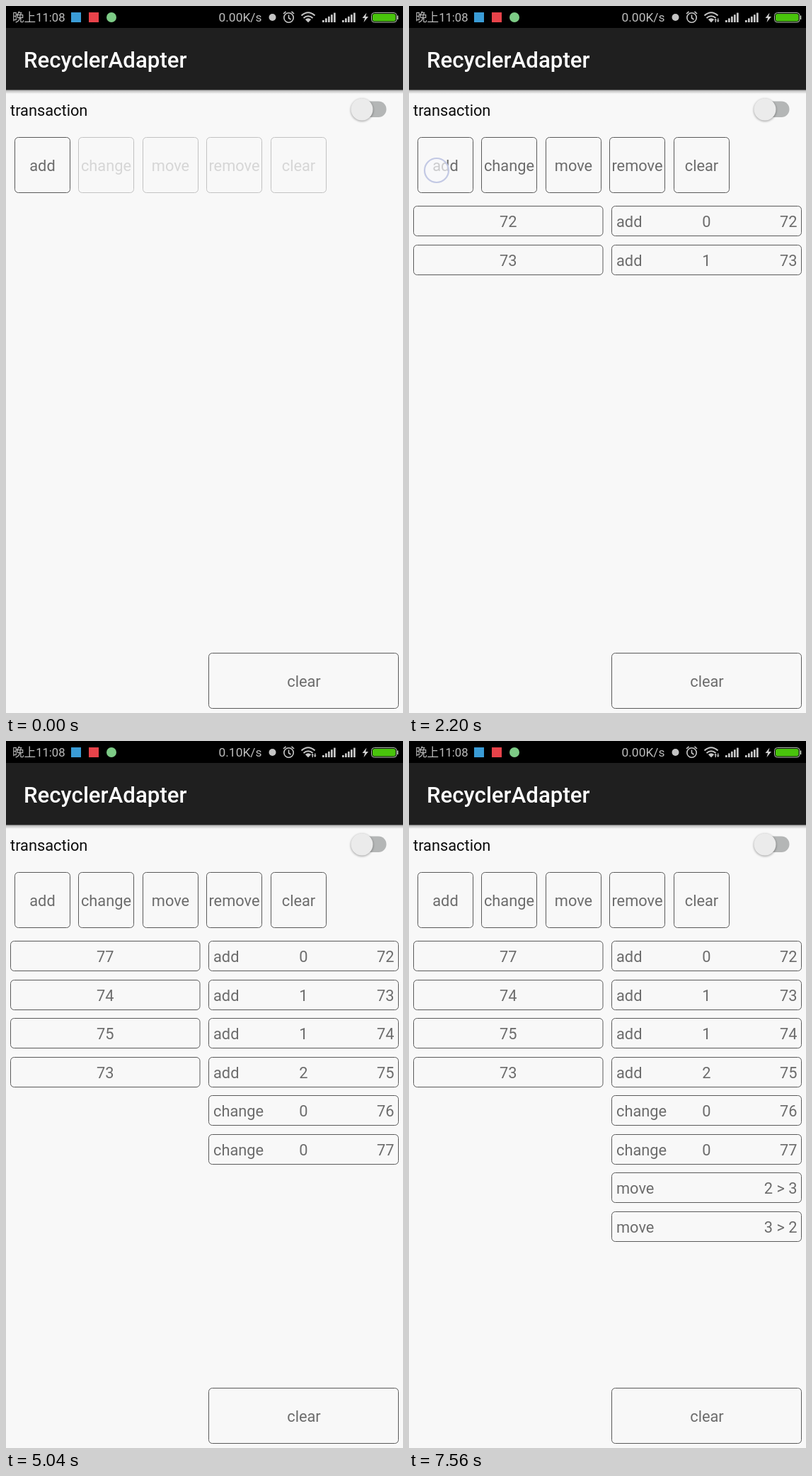
These frames come from a looping animation (561 px wide and 998 px high, 8000 ms). An HTML page:

```html
<!DOCTYPE html>
<html lang="zh">
<head>
<meta charset="utf-8">
<title>RecyclerAdapter</title>
<style>
  html, body { margin: 0; width: 100%; height: 100%; overflow: hidden; background: #f8f8f8; }
  svg { display: block; width: 561px; height: 998px; }
  text { font: 21.8px Roboto, sans-serif; fill: #6c6c6c; }
  .mid { text-anchor: middle; }
  .end { text-anchor: end; }
  .box { fill: none; stroke: #5a5a5a; }
  .status { font: 16.6px Roboto, "Noto Sans CJK SC", "Noto Sans CJK", sans-serif; fill: #bdbdbd; }
  .title { font-size: 31.2px; font-weight: 500; fill: #fff; }
  .off .box { stroke: #c2c2c2; }
  .off text { fill: #d6d6d6; }
</style>
</head>
<body>
<svg id="stage" viewBox="0 0 561 998">
  <defs>
    <linearGradient id="shade" x2="0" y2="1">
      <stop offset="0" stop-color="#000" stop-opacity=".32"/>
      <stop offset="1" stop-color="#000" stop-opacity="0"/>
    </linearGradient>
    <filter id="soft" x="-30%" y="-30%" width="160%" height="160%"><feGaussianBlur stdDeviation="1.5"/></filter>
  </defs>
  <rect width="561" height="998" fill="#f8f8f8"/>
  <rect y="118" width="561" height="6" fill="url(#shade)"/>
  <rect y="31" width="561" height="87.5" fill="#1f1f1f"/>
  <rect width="561" height="31" fill="#000"/>
  <text class="title" x="25" y="87">RecyclerAdapter</text>

  <text class="status" x="9" y="22">晚上11:08</text>
  <rect x="92" y="9" width="14" height="14" fill="#3a9cd6"/>
  <rect x="117" y="9" width="14" height="14" fill="#e8434a"/>
  <circle cx="149" cy="16" r="7" fill="#7dcb86"/>
  <text id="speed" class="status end" x="361.5" y="22" style="font-size:17.4px"></text>
  <circle cx="376.5" cy="16" r="5" fill="#c4c4c4"/>
  <g fill="none" stroke="#c8c8c8" stroke-width="1.6">
    <circle cx="399.5" cy="16.5" r="6.7"/>
    <path d="M399.5 12.5v4.5l3 2M392 11l3.5-3.2M407 11l-3.5-3.2"/>
    <path d="M417.5 13.5q9.5-8.5 19 0M420.5 17q6.500-5.500 13 0" stroke-width="2"/>
  </g>
  <path d="M422.800 19q4.200-3.400 8.400 0l-4.200 4.300z" fill="#c8c8c8"/>
  <path id="arrows" d="M432.500 23v-3h-1.200l1.900-2.300 1.900 2.300h-1.200v3zM436 17.500v3h-1.200l1.900 2.500 1.900-2.500h-1.200v-3z" fill="#c8c8c8"/>
  <g id="signal" fill="#c8c8c8"></g>
  <path d="M509.500 9.500l-6 7.500h3.600l-1.600 6 6.500-8h-3.800z" fill="#d0d0d0"/>
  <rect x="516.500" y="9.500" width="35.500" height="13.500" rx="4" fill="#000" stroke="#b9c4b4"/>
  <rect x="518" y="11" width="32.500" height="10.500" rx="2.800" fill="#49c40c"/>
  <rect x="552.500" y="13.500" width="1.800" height="5.500" fill="#b9c4b4"/>

  <text x="6" y="154.500" style="fill:#0c0c0c">transaction</text>
  <rect x="492" y="134.500" width="45.500" height="22.500" rx="11.200" fill="#b4b6b6"/>
  <circle cx="503" cy="147" r="16" fill="#000" opacity=".3" filter="url(#soft)"/>
  <circle cx="503" cy="146" r="15.500" fill="#ebebeb"/>
  <g id="buttons"></g>
  <g id="rows"></g>
  <circle id="touch" r="17" fill="#fafafd" fill-opacity=".68" stroke="#c3c9e4" stroke-width="2.200"/>
</svg>
<script>
const LOOP = 8000, FADE = 120, MOVE = 250;
const $ = id => document.getElementById(id);

function add(parent, tag, attrs, label) {
  const el = document.createElementNS("http://www.w3.org/2000/svg", tag);
  for (const key in attrs) el.setAttribute(key, attrs[key]);
  if (label !== undefined) el.textContent = label;
  parent.append(el);
  return el;
}
const box = (g, x, y, width, height) =>
  add(g, "rect", { class: "box", x, y, width, height, rx: 5 });
const label = (g, x, y, s, cls = "") => add(g, "text", { x, y, class: cls }, s);

// Each touch: start, moment the click acts, position
const taps = [
  [1000, 1180, 39, 232], [2040, 2240, 39, 232],
  [3400, 3610, 157, 233], [4560, 4770, 157, 233],
  [5800, 6040, 220, 227], [6800, 7040, 220, 227]
];
const [add1, add2, change1, change2, move1, move2] = taps.map(tap => tap[1]);

// Left column: value, first row, fade in, fade length, moves, fade out
const cells = [
  { n: 72, row: 0, from: add1, fade: FADE, moves: [], to: change1 },
  { n: 73, row: 1, from: add1, fade: FADE, moves: [[add2, 3], [move1, 2], [move2, 3]] },
  { n: 74, row: 1, from: add2 + MOVE, fade: FADE, moves: [] },
  { n: 75, row: 2, from: add2 + MOVE, fade: FADE, moves: [[move1, 3], [move2, 2]] },
  { n: 76, row: 0, from: change1, fade: MOVE, moves: [], to: change2 },
  { n: 77, row: 0, from: change2, fade: MOVE, moves: [] }
];

// Right column: time, action, index, value
const logs = [
  [add1, "add", 0, 72], [add1, "add", 1, 73],
  [add2, "add", 1, 74], [add2, "add", 2, 75],
  [change1, "change", 0, 76], [change2, "change", 0, 77],
  [move1, "move", "", "2 > 3"], [move2, "move", "", "3 > 2"]
];
const speeds = [[0, "0.00K/s"], [3440, "0.10K/s"], [7560, "0.00K/s"]];

for (const x of [447, 475])
  for (let i = 0; i < 5; i++) {
    const height = 3 + i * 2.6;
    add($("signal"), "rect", { x: x + i * 4, y: 23 - height, width: 2.7, height });
  }

const late = [];
["add", "change", "move", "remove", "clear"].forEach((name, i) => {
  const g = add($("buttons"), "g", {});
  const x = Math.floor(12 + i * 90.5) + .5;
  box(g, x, 185.5, 78, 78);
  label(g, x + 39, 233, name, "mid");
  if (i) late.push(g);
});
box($("buttons"), 286.5, 913.5, 268, 78);
label($("buttons"), 421, 961, "clear", "mid");

const rowY = row => Math.round(row * 54.57);
const place = (g, row) => g.setAttribute("transform", `translate(0 ${rowY(row)})`);

for (const cell of cells) {
  cell.g = add($("rows"), "g", {});
  box(cell.g, 6.5, 282.5, 267.5, 42);
  label(cell.g, 140.3, 312, cell.n, "mid");
}
const logRows = logs.map(([from, action, index, value], row) => {
  const g = add($("rows"), "g", {});
  box(g, 286.5, 282.5, 268, 42);
  label(g, 293, 312, action);
  label(g, 420.5, 312, index, "mid");
  label(g, 548.5, 312, value, "end");
  place(g, row);
  return { g, from };
});

const ramp = (t, from, length) => Math.min(1, Math.max(0, (t - from) / length));
const ease = p => .5 - Math.cos(Math.PI * p) / 2;

function draw(t) {
  for (const { g, row, from, fade, moves, to } of cells) {
    let y = row;
    for (const [at, next] of moves) y += (next - y) * ease(ramp(t, at, MOVE));
    place(g, y);
    const out = to ? ease(ramp(t, to, MOVE)) : 0;
    g.setAttribute("opacity", ease(ramp(t, from, fade)) * (1 - out));
  }
  for (const { g, from } of logRows) g.setAttribute("opacity", ease(ramp(t, from, FADE)));
  for (const g of late) g.setAttribute("class", t < add1 ? "off" : "");

  const tap = taps.filter(([start]) => t >= start).pop();
  const touch = $("touch");
  touch.setAttribute("opacity", tap ? 1 - ramp(t, tap[1] - 20, 200) : 0);
  if (tap) {
    touch.setAttribute("cx", tap[2]);
    touch.setAttribute("cy", tap[3]);
  }
  $("speed").textContent = speeds.filter(([at]) => t >= at).pop()[1];
  $("arrows").setAttribute("opacity", t < 2080 ? 0 : 1);
}

function tick() {
  draw(performance.now() % LOOP);
  requestAnimationFrame(tick);
}
tick();
</script>
</body>
</html>
```
